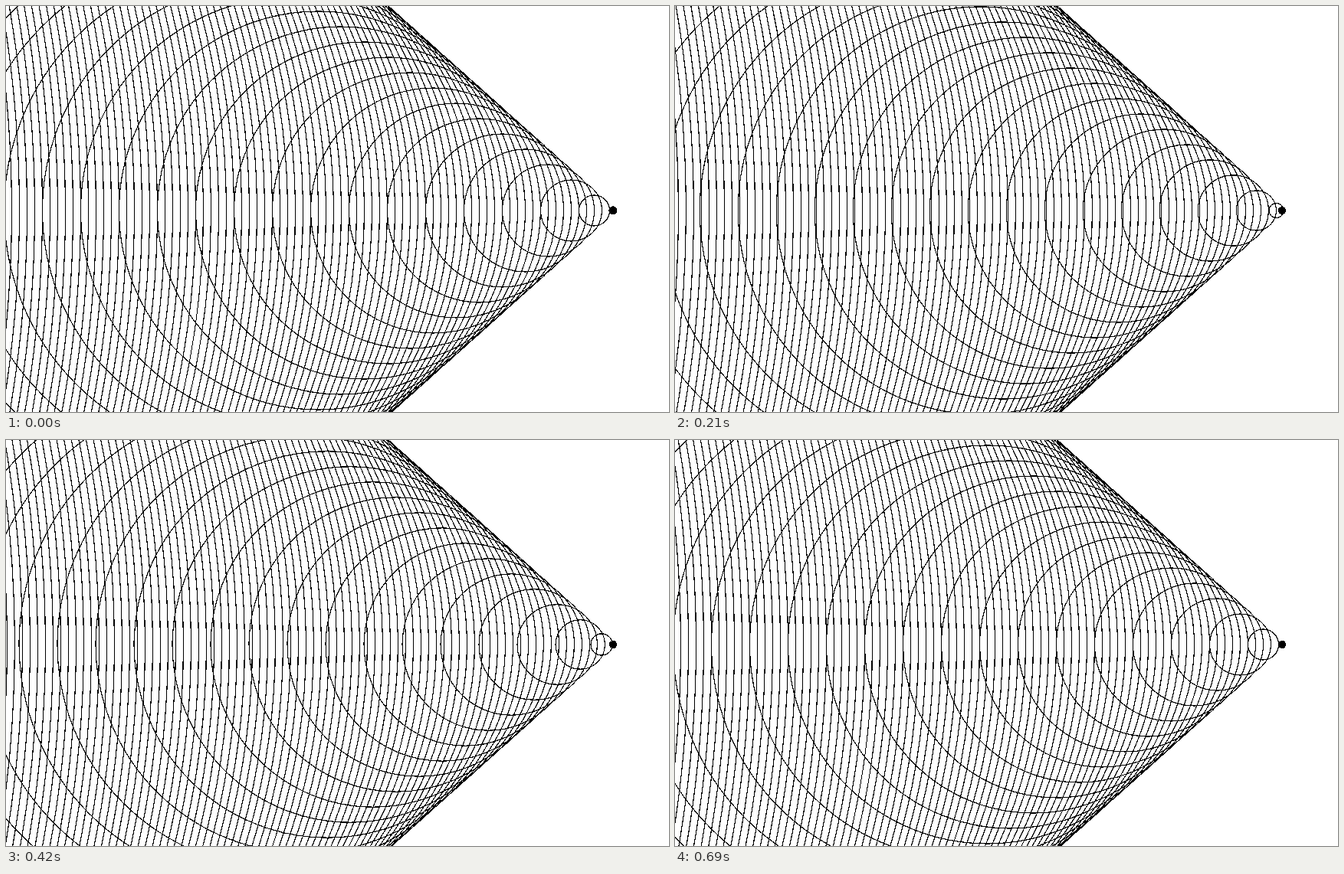
An HTML page for the animation above (720 ms loop, 865 by 530 pixels).

```html
<!DOCTYPE html>
<html lang="en">
<head>
<meta charset="utf-8">
<title>Mach cone</title>
<style>
  html, body { margin: 0; width: 100%; height: 100%; overflow: hidden; background: #fff; }
  svg { display: block; width: 865px; height: 530px; shape-rendering: crispEdges; }
  .wave {
    fill: none;
    stroke: #000;
    stroke-width: 1.2px;
    animation: spread 720ms steps(24, jump-none) infinite;
  }
  @keyframes spread {
    from { cx: var(--x0); r: var(--r0); }
    to { cx: var(--x1); r: var(--r1); }
  }
</style>
</head>
<body>
<svg viewBox="0 0 865 530">
  <g id="waves"></g>
  <circle cx="792" cy="267" r="5.2"/>
</svg>
<script>
  const COUNT = 84, CY = 267;
  const waves = document.getElementById('waves');

  // Mach 1.5: centres fall back 30 while radii grow 20; the newest wave starts on the dot.
  const state = i => i === 0 ? [792, 5] : [797.5 - 30 * i, 20 * i];

  for (let i = 0; i < COUNT; i++) {
    const c = document.createElementNS('http://www.w3.org/2000/svg', 'circle');
    c.setAttribute('class', 'wave');
    c.setAttribute('cy', CY);
    [state(i), state(i + 1)].forEach(([x, r], k) => {
      c.style.setProperty('--x' + k, x + 'px');
      c.style.setProperty('--r' + k, r + 'px');
    });
    waves.append(c);
  }
</script>
</body>
</html>
```
